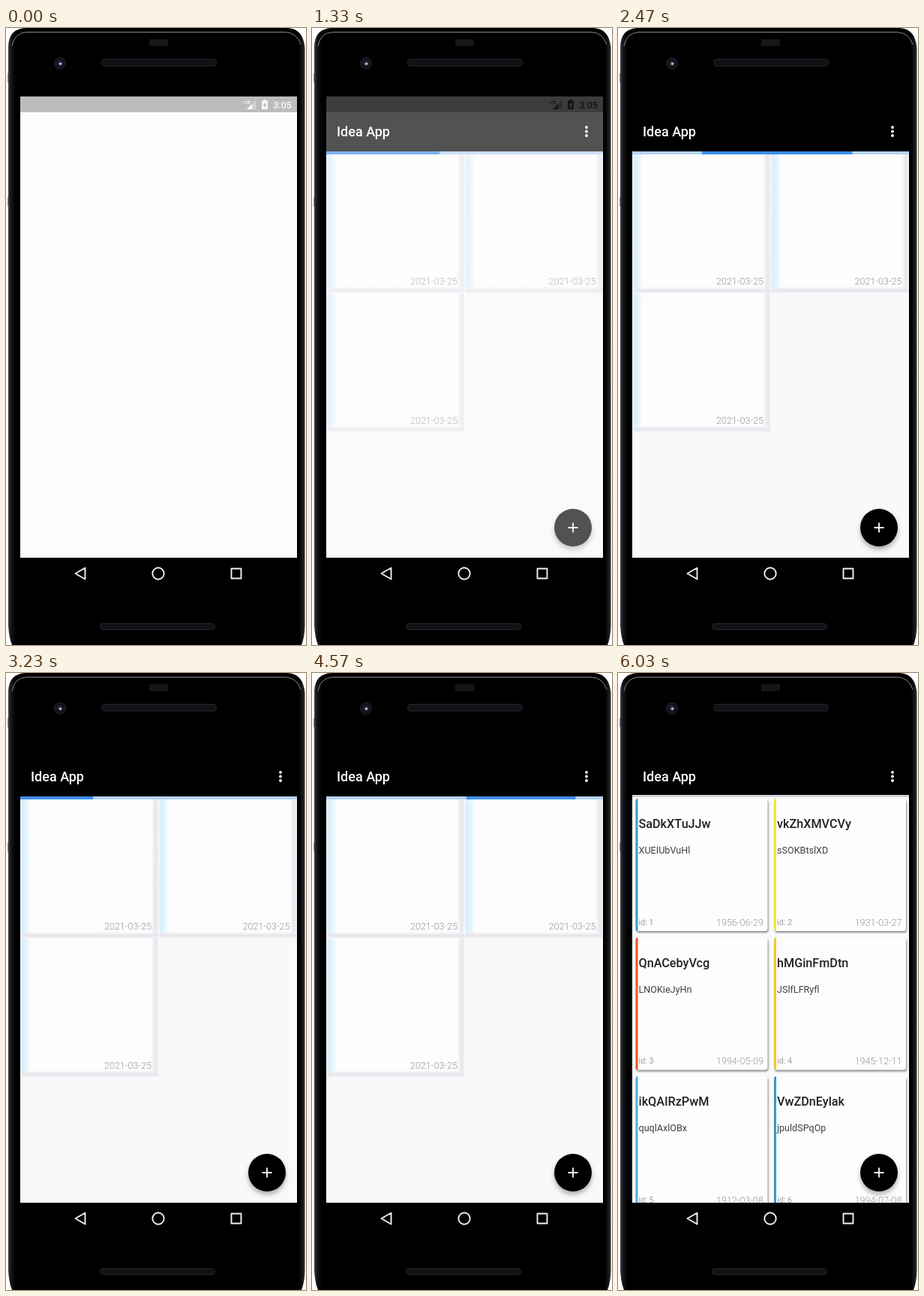
Animation, 400 px wide and 820 px high, one loop 6060 ms. Source, as an HTML page:

```html
<!DOCTYPE html>
<html lang="en">
<head>
<meta charset="utf-8">
<style>
  html, body { margin: 0; width: 100%; height: 100%; overflow: hidden; background: #000; }
  svg { display: block; width: 400px; height: 820px; font-family: Roboto, sans-serif; }
  .bar { font-size: 18px; font-weight: 500; fill: #fff; }
  .title { font-size: 16.2px; font-weight: 500; fill: #222; }
  .sub { font-size: 12.6px; fill: #404040; }
  .id { font-size: 10.8px; fill: #9c9c9c; }
  .date { font-size: 12.6px; font-weight: 300; fill: #989898; text-anchor: end; }
  .nav { fill: none; stroke: #f0f0f0; stroke-width: 1.9; stroke-linejoin: round; }
  .fab { filter: drop-shadow(0 4px 3px #66666c88); }
  .raised { filter: drop-shadow(1.3px 2px 1.2px #606068bb); }
</style>
</head>
<body>
<svg viewBox="0 0 400 820">
  <defs>
    <linearGradient id="left"><stop stop-color="#d6eefc"/><stop offset=".5" stop-color="#e2f3fd"/><stop offset="1" stop-color="#fdfdfd"/></linearGradient>
    <linearGradient id="right"><stop stop-color="#fdfdfd"/><stop offset=".65" stop-color="#e6e6ee"/><stop offset="1" stop-color="#f0f0f5"/></linearGradient>
    <linearGradient id="bottom" x2="0" y2="1"><stop stop-color="#fdfdfd00"/><stop offset=".65" stop-color="#e4e4ec"/><stop offset="1" stop-color="#f0f0f5"/></linearGradient>
    <linearGradient id="rim"><stop stop-color="#44444a"/><stop offset=".008" stop-color="#18181c"/><stop offset=".025" stop-color="#000"/><stop offset=".98" stop-color="#000"/><stop offset="1" stop-color="#2a2a30"/></linearGradient>
    <clipPath id="screen"><path d="M19 91H388V704H19Z"/></clipPath>
    <clipPath id="track"><path d="M19 164H388V168H19Z"/></clipPath>
  </defs>

  <!-- phone body -->
  <path fill="#fff" d="M0 0H400V820H0Z"/>
  <path fill="#8c8c90" d="M2 60H6V72H2ZM2 225H6V237H2Z"/>
  <path fill="url(#rim)" d="M3 795V24Q4 1 26 0H376Q396 1 398.500 26V795Q398 810 394 820H8Q4 810 3 795Z"/>
  <path fill="none" stroke="#84848a" stroke-width="1" d="M8 24Q11 6 28 5.500H372Q388 6 393 22"/>
  <path fill="#16161a" d="M191 15H216V24H191Z"/>
  <g fill="#111116" stroke="#25252c">
    <rect x="127.500" y="41.500" width="153" height="9" rx="4"/>
    <rect x="125.500" y="791.500" width="153" height="8" rx="4"/>
    <circle cx="72" cy="47" r="7.500"/>
  </g>
  <circle cx="72" cy="47" r="4" fill="#20223a"/>
  <circle cx="72.500" cy="47.500" r="1.800" fill="#b8bcd0"/>
  <path class="nav" d="M105.500 717.500V732.500L92.500 725ZM300.500 718.500H313.500V731.500H300.500Z"/>
  <circle class="nav" cx="203" cy="725" r="7.700"/>

  <g clip-path="url(#screen)">
    <path fill="#fdfdfd" d="M19 91H388V704H19Z"/>
    <path fill="#bcbcbc" d="M19 91H388V112H19Z"/>
    <g id="app">
      <path fill="#f9f9fa" d="M19 112H388V704H19Z"/>
      <g id="loading">
        <g clip-path="url(#track)">
          <path fill="#b4d2f6" d="M19 164H388V168H19Z"/>
          <rect id="runA" y="164" height="4" fill="#3c8ff0"/>
          <rect id="runB" y="164" height="4" fill="#3c8ff0"/>
        </g>
      </g>
      <g id="loaded">
        <path fill="#d4d4d8" d="M19 162H388V165H19Z"/>
      </g>
      <path d="M19 91H388V162H19Z"/>
      <path id="edge" d="M19 162H388V164H19Z"/>
      <text class="bar" x="33" y="144">Idea App</text>
      <g fill="#fff"><circle cx="366" cy="132" r="1.900"/><circle cx="366" cy="137.500" r="1.900"/><circle cx="366" cy="143" r="1.900"/></g>
      <circle class="fab" cx="348" cy="664" r="25"/>
      <path stroke="#fff" stroke-width="1.800" d="M341.500 664H354.500M348 657.500V670.500"/>
    </g>
    <g id="status">
      <text x="317" y="100.500" font-size="5.500" font-weight="700">LTE</text>
      <path d="M321 108L333.500 95.500V108Z" opacity=".35"/>
      <path d="M321 108L328 101V108Z"/>
      <path fill-rule="evenodd" d="M341 96.500H343.500V95H346.500V96.500H349V108H341ZM346 98L342.500 103H344.500V106.500L347.500 101.500H345.500Z"/>
      <text x="381" y="106.500" font-size="12.600" font-weight="500" text-anchor="end">3:05</text>
    </g>
  </g>
</svg>
<script>
const LOOP = 6060, FADE_START = 1095, FADE_TIME = 350, LOADED_AT = 4600;
const BAR_START = 975, BAR_CYCLE = 2000;
const $ = id => document.getElementById(id);

function placeholder(x, y) {
  return `<g transform="translate(${x} ${y})">
    <rect width="183" height="184" rx="4" fill="#fdfdfd"/>
    <rect width="13" height="184" fill="url(#left)"/>
    <rect x="173" width="10" height="184" fill="url(#right)"/>
    <rect y="174" width="183" height="10" fill="url(#bottom)"/>
    <text class="date" x="174" y="173">2021-03-25</text></g>`;
}

function card([title, sub, date, color], i) {
  const x = 23.5 + i % 2 * 184.5, y = 167 + (i >> 1) * 184.5;
  return `<g transform="translate(${x} ${y})">
    <rect class="raised" width="176" height="176" rx="3.5" fill="#fdfdfd"/>
    <path fill="${color}" d="M3 0V176Q0 176 0 173V3Q0 0 3 0Z"/>
    <text class="title" x="4" y="39">${title}</text>
    <text class="sub" x="4" y="73">${sub}</text>
    <text class="id" x="4" y="167.5">id: ${i + 1}</text>
    <text class="date" x="170.5" y="168.5">${date}</text></g>`;
}

const cards = [
  ['SaDkXTuJJw', 'XUEIUbVuHl', '1956-06-29', '#369cd0'],
  ['vkZhXMVCVy', 'sSOKBtslXD', '1931-03-27', '#f6e63c'],
  ['QnACebyVcg', 'LNOKieJyHn', '1994-05-09', '#f4511e'],
  ['hMGinFmDtn', 'JSlfLFRyfl', '1945-12-11', '#f6c62c'],
  ['ikQAIRzPwM', 'quqlAxlOBx', '1912-03-08', '#42b4e6'],
  ['VwZDnEylak', 'jpuldSPqOp', '1994-07-08', '#3c98c0']
];
$('loading').insertAdjacentHTML('afterbegin',
  placeholder(20, 168) + placeholder(204.5, 168) + placeholder(20, 352.5));
$('loaded').insertAdjacentHTML('beforeend', cards.map(card).join(''));

function bezier(x, x1, y1, x2, y2) {
  const at = (t, a, b) => 3 * (1 - t) ** 2 * t * a + 3 * (1 - t) * t * t * b + t ** 3;
  let lo = 0, hi = 1;
  for (let i = 0; i < 24; i++) {
    const mid = (lo + hi) / 2;
    if (at(mid, x1, x2) < x) lo = mid; else hi = mid;
  }
  return at(lo, y1, y2);
}

// Each key: [progress, value, easing to the next key]
function track(keys, p) {
  const i = keys.findIndex(k => k[0] > p);
  const [p0, v0, ease] = keys[i - 1], [p1, v1] = keys[i];
  return ease ? v0 + (v1 - v0) * bezier((p - p0) / (p1 - p0), ...ease) : v0;
}

const runners = [
  { el: $('runA'), start: -.951666,
    move: [[0, 0], [.2, 0, [.5, 0, .7017, .4958]], [.5915, .836714, [.3024, .3814, .55, .9564]], [1, 2.006111]],
    size: [[0, .08], [.3665, .08, [.3347, .1248, .7858, 1]], [.68325, .661479, [.2257, 0, .2336, .629]], [1, .08]] },
  { el: $('runB'), start: -.048889,
    move: [[0, 0, [.15, 0, .5151, .4097]], [.25, .376519, [.3103, .2841, .8, .7337]], [.4835, .843862, [.4, .627, .6, .902]], [1, 1.602778]],
    size: [[0, .08, [.205, .0571, .5766, .454]], [.1915, .457104, [.1523, .1964, .6484, 1.0043]], [.4415, .72796, [.2578, -.0032, .2118, .618]], [1, .08]] }
];

function draw(t) {
  const fade = Math.min(1, Math.max(0, (t - FADE_START) / FADE_TIME));
  const loaded = t >= LOADED_AT;
  $('app').setAttribute('opacity', fade);
  $('loading').style.display = loaded ? 'none' : '';
  $('loaded').style.display = loaded ? '' : 'none';
  $('edge').style.display = loaded ? 'none' : '';
  const ink = Math.round(60 * (1 - fade));
  $('status').setAttribute('fill', t < 600 ? '#f8f8f8' : `rgb(${ink},${ink},${ink})`);

  const p = Math.max(0, t - BAR_START) % BAR_CYCLE / BAR_CYCLE;
  for (const { el, start, move, size } of runners) {
    const w = track(size, p), mid = start + track(move, p);
    el.setAttribute('x', 19 + 369 * (mid - w / 2));
    el.setAttribute('width', 369 * w);
  }
}

const begin = performance.now();
function frame() {
  draw((performance.now() - begin) % LOOP);
  requestAnimationFrame(frame);
}
frame();
</script>
</body>
</html>
```
